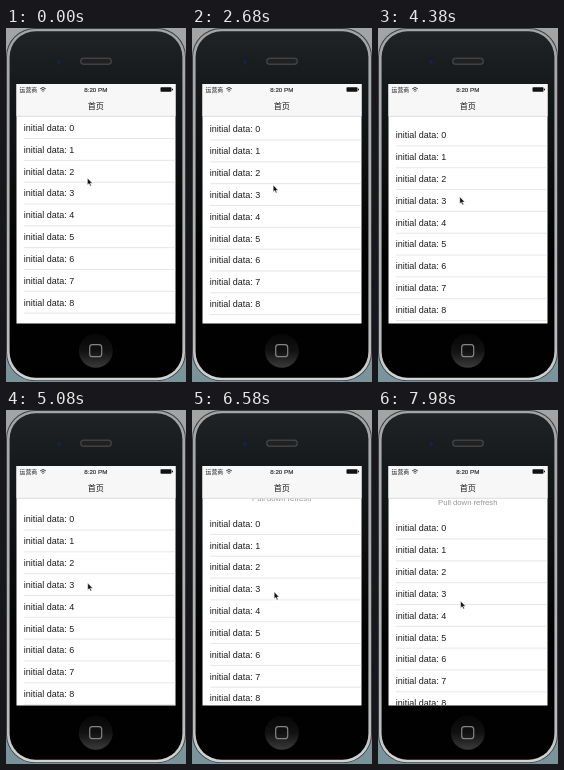
An HTML page for the animation above (8000 ms loop, 180x354 px).

```html
<!DOCTYPE html>
<html lang="zh">
<head>
<meta charset="utf-8">
<style>
  html, body { margin: 0; width: 100%; height: 100%; overflow: hidden; background: #8b9698; }
  svg { display: block; width: 180px; height: 354px; }
  text { font-family: "Liberation Sans", Arial, sans-serif; fill: #1c1c1c; }
  .cjk { font-family: "Noto Sans CJK SC", "Noto Sans CJK", sans-serif; }
</style>
</head>
<body>
<svg viewBox="0 0 180 354">
  <defs>
    <linearGradient id="desk" x2="0" y2="1">
      <stop offset="0" stop-color="#a2a4a5"/>
      <stop offset=".5" stop-color="#9a9fa1"/>
      <stop offset="1" stop-color="#78949a"/>
    </linearGradient>
    <linearGradient id="steel" x2="0" y2="1">
      <stop offset="0" stop-color="#a2a4a5"/>
      <stop offset=".9" stop-color="#b8babb"/>
      <stop offset="1" stop-color="#d4d5d6"/>
    </linearGradient>
    <linearGradient id="glass" x2="0" y2="1">
      <stop offset="0" stop-color="#202326"/>
      <stop offset=".16" stop-color="#16191b"/>
      <stop offset=".65" stop-color="#020202"/>
      <stop offset="1" stop-color="#000"/>
    </linearGradient>
    <linearGradient id="button" x2="0" y2="1">
      <stop offset="0" stop-color="#060606"/>
      <stop offset=".5" stop-color="#111"/>
      <stop offset="1" stop-color="#3a3a3c"/>
    </linearGradient>
    <clipPath id="view"><rect x="10.5" y="88.5" width="159" height="207"/></clipPath>
  </defs>

  <!-- phone -->
  <rect width="180" height="354" fill="url(#desk)"/>
  <rect x="0" y="0" width="180" height="353" rx="29" fill="#3c3e3f"/>
  <rect x="1" y="1" width="178" height="351.3" rx="28" fill="url(#steel)"/>
  <rect x="3.6" y="3.2" width="172.8" height="346.6" rx="26" fill="url(#glass)"/>
  <circle cx="53" cy="33.7" r="4" fill="#191c22"/>
  <circle cx="53" cy="33.7" r="2.2" fill="#1c2236"/>
  <rect x="74" y="29.5" width="32" height="7.5" rx="3.75" fill="#3f4143"/>
  <rect x="75.5" y="31" width="29" height="4.5" rx="2.25" fill="#202123"/>
  <circle cx="89.8" cy="322.8" r="17" fill="url(#button)"/>
  <rect x="83.7" y="316.7" width="12" height="12" rx="2.8" fill="none" stroke="#858587" stroke-width="1.2"/>

  <!-- screen -->
  <rect x="10.5" y="56" width="159" height="239.5" fill="#fff"/>
  <g clip-path="url(#view)"><g id="list">
    <text x="89.8" y="76.6" font-size="7.7" text-anchor="middle" style="fill:#959595">Pull down refresh</text>
  </g></g>
  <rect x="10.5" y="56" width="159" height="32" fill="#f7f7f7"/>
  <path d="M10.5 88.3H169.5" stroke="#c4c4c4" stroke-width=".6"/>
  <text class="cjk" x="13.6" y="63.8" font-size="5.8">运营商</text>
  <g fill="none" stroke="#222" stroke-width=".9">
    <path d="M34.2 60.8Q37 58.2 39.8 60.8M35.4 62.2Q37 60.8 38.6 62.2"/>
    <path d="M36.5 63.4H37.5"/>
  </g>
  <text x="89.8" y="63.9" font-size="6.2" text-anchor="middle" stroke="#222" stroke-width=".12">8:20 PM</text>
  <rect x="154.5" y="59.3" width="11" height="4.4" rx=".8" fill="#111"/>
  <rect x="166" y="60.7" width="1" height="1.6" fill="#111"/>
  <text class="cjk" x="89.8" y="80.5" font-size="8.1" font-weight="500" text-anchor="middle">首页</text>

  <path id="cursor" d="M0 0V7L1.6 5.6L2.7 8.1L3.9 7.6L2.8 5.2H5Z" fill="#111" stroke="#fff" stroke-width=".5"/>
</svg>
<script>
const list = document.getElementById("list");
const cursor = document.getElementById("cursor");
const ROW = 21.83, LOOP = 8000, PULL_START = 154;

let rows = "";
for (let i = 0; i < 9; i++) {
  const y = i * ROW;
  rows += `<text x="17.7" y="${102.9 + y}" font-size="9">initial data: ${i}</text>
    <path d="M18 ${110.5 + y}H169.5" stroke="#d6d6d6" stroke-width=".6"/>`;
}
list.innerHTML += rows;

// time, pointer x, pointer y
const path = [
  [0, 81.4, 150], [340, 81, 151], [1280, 81, 151], [2180, 81, 153.7],
  [2680, 81.2, 157], [3580, 81.8, 164], [5080, 81.7, 173],
  [5980, 82.2, 178], [7080, 82.2, 185], [7980, 82.6, 191]
];

function pointer(t) {
  const n = path.findIndex(p => p[0] > t);
  if (n < 0) return path[path.length - 1].slice(1);
  const a = path[n - 1], b = path[n];
  const k = (t - a[0]) / (b[0] - a[0]);
  return [1, 2].map(j => a[j] + (b[j] - a[j]) * k);
}

function draw(now) {
  const t = now % LOOP;
  const step = Math.max(0, Math.floor((t - 80) / 100) * 100 + 80);
  const [x, y] = pointer(step);
  // the list follows the drag at half speed
  const pull = Math.max(0, (y - PULL_START) / 2);
  list.setAttribute("transform", `translate(0 ${pull})`);
  cursor.setAttribute("transform", `translate(${x} ${y})`);
  requestAnimationFrame(draw);
}
draw(performance.now());
</script>
</body>
</html>
```
